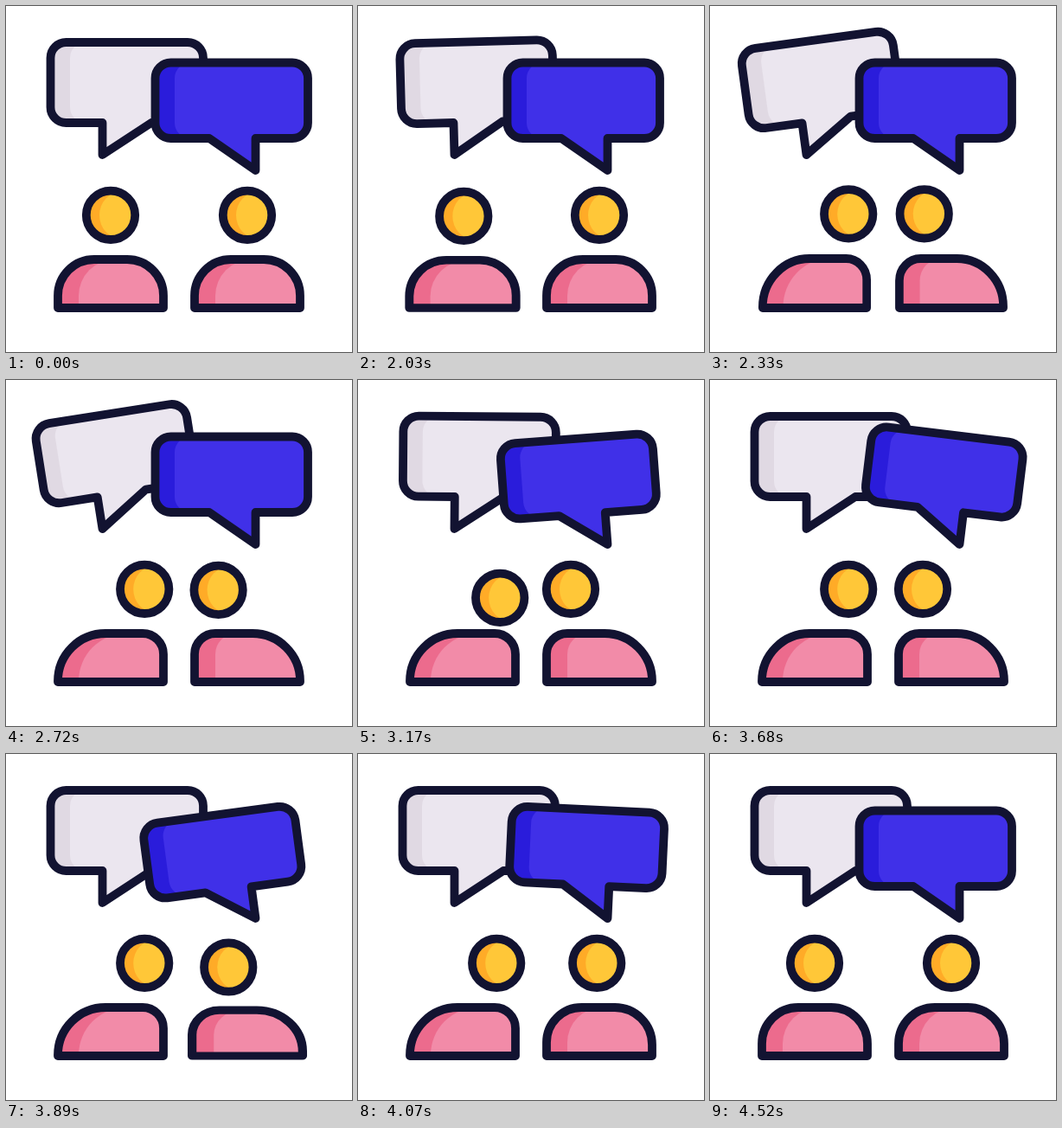
Animation of 400 by 400 pixels, one loop 4550 ms. Source, as an HTML page with a canvas:

```html
<!DOCTYPE html>
<html lang="en">
<head>
<meta charset="utf-8">
<title>Conversation</title>
<style>
  html, body { margin: 0; width: 100%; height: 100%; overflow: hidden; background: #fff; }
  canvas { display: block; width: 400px; height: 400px; }
</style>
</head>
<body>
<canvas id="stage"></canvas>
<script>
const LOOP = 4550, HOLD = 2030, STEP = 30;
const INK = '#121331';

const canvas = document.getElementById('stage');
const ctx = canvas.getContext('2d');
const ratio = window.devicePixelRatio || 1;
canvas.width = canvas.height = 400 * ratio;

// Eased value from [time, value] keys
function tween(keys, t) {
  if (t <= keys[0][0]) return keys[0][1];
  for (let i = 1; i < keys.length; i++) {
    const [t0, v0] = keys[i - 1], [t1, v1] = keys[i];
    if (t < t1) {
      const u = (t - t0) / (t1 - t0);
      return v0 + (v1 - v0) * u * u * (3 - 2 * u);
    }
  }
  return keys[keys.length - 1][1];
}

const swing = t => tween([[0, 0], [8.2, -20.5], [16.1, 15], [24.6, -9], [33, 2.9], [41.5, 0]], t);
const nod = t => tween([[0, 0], [5, 1], [10, 0], [15, 1], [20, 0]], t);

// Filled shape with a lighter part clipped inside, then its outline
function shape(path, dark, light, lightPath) {
  ctx.save();
  ctx.clip(path);
  ctx.fillStyle = dark;
  ctx.fillRect(0, 0, 400, 400);
  ctx.fillStyle = light;
  ctx.fill(lightPath);
  ctx.restore();
  ctx.strokeStyle = INK;
  ctx.lineWidth = 9.8;
  ctx.lineJoin = 'round';
  ctx.stroke(path);
}

function bubble({ path, shade, pivot: [x, y], dark, light }, angle) {
  ctx.save();
  ctx.translate(x, y);
  ctx.rotate(angle * Math.PI / 180);
  ctx.translate(-x, -y);
  shape(path, dark, light, shade);
  ctx.restore();
}

function lightSide(x, y, h) {
  const p = new Path2D();
  p.roundRect(x, y, 260, h, 18);
  return p;
}

const white = {
  path: new Path2D('M69.5 42H210a18 18 0 0 1 18 18V117a18 18 0 0 1 -18 18H168L111.5 172V135H69.5a18 18 0 0 1 -18 -18V60a18 18 0 0 1 18 -18Z'),
  shade: lightSide(74, 42, 150),
  pivot: [111.5, 172], dark: '#e0d9e3', light: '#ebe6ef'
};
white.shade = new Path2D('M92 42H240V180H110V135H92a18 18 0 0 1 -18 -18V60a18 18 0 0 1 18 -18Z');

const blue = {
  path: new Path2D('M190.5 65.5H331a18 18 0 0 1 18 18V135a18 18 0 0 1 -18 18H288.5V190L235 153H190.5a18 18 0 0 1 -18 -18V83.5a18 18 0 0 1 18 -18Z'),
  shade: new Path2D('M213 65.5H360V200H230V153H213a18 18 0 0 1 -18 -18V83.5a18 18 0 0 1 18 -18Z'),
  pivot: [288.5, 190], dark: '#2a1cdb', light: '#4030e8'
};

function head(x, y) {
  const ring = new Path2D(), light = new Path2D();
  ring.arc(x, y, 28.2, 0, 7);
  light.ellipse(x + 12, y, 25, 27, 0, 0, 7);
  shape(ring, '#ffab27', '#ffc738', light);
}

function torso(x, rl, rr) {
  return new Path2D(`M${x} 349V${293 + rl}A${rl} ${rl} 0 0 1 ${x + rl} 293` +
    `H${x + 122 - rr}A${rr} ${rr} 0 0 1 ${x + 122} ${293 + rr}V349Z`);
}

// turn: 0 facing out, 1 facing the partner; dir: 1 leans right, -1 left
function person(cx, dir, reach, turn, bob, dip) {
  head(cx + dir * (reach * turn + 4 * dip), 241.8 + bob + 10 * dip);
  const wide = 42 + 13 * turn, tight = 42 - 18 * turn;
  const [rl, rr] = dir > 0 ? [wide, tight] : [tight, wide];
  ctx.save();
  ctx.translate(cx, 349);
  ctx.scale(1 + bob * .01, 1 - bob * .012);
  ctx.translate(-cx, -349);
  shape(torso(cx - 61, rl, rr), '#ec6b8d', '#f28ba8', torso(cx - 37, rl, 1));
  ctx.restore();
}

function draw(now) {
  const ms = now % LOOP;
  const n = ms < HOLD ? -1 : Math.floor((ms - 2000) / STEP);

  ctx.setTransform(ratio, 0, 0, ratio, 0, 0);
  ctx.fillStyle = '#fff';
  ctx.fillRect(0, 0, 400, 400);

  bubble(white, swing(n + .4));
  bubble(blue, swing(n - 36.6));

  const turnL = tween([[-.1, 0], [10, 1], [70, 1], [83.5, 0]], n);
  const turnR = tween([[1.7, 0], [12.5, 1], [57.5, 1], [71.5, 0]], n);
  const bobL = tween([[0, 0], [4, 6], [10.5, -1.5], [14, 0], [70, 0], [75, 5], [81, 0]], n + .1);
  const bobR = tween([[1, 0], [5, 6], [11, -1.5], [15, 0], [57, 0], [62, 5], [69, 0]], n);

  person(121, 1, 39.2, turnL, bobL, nod(n - 34));
  person(279, -1, 33, turnR, bobR, nod(n - 13));
}

const start = performance.now();
function tick() {
  draw(performance.now() - start);
  requestAnimationFrame(tick);
}
tick();
</script>
</body>
</html>
```
